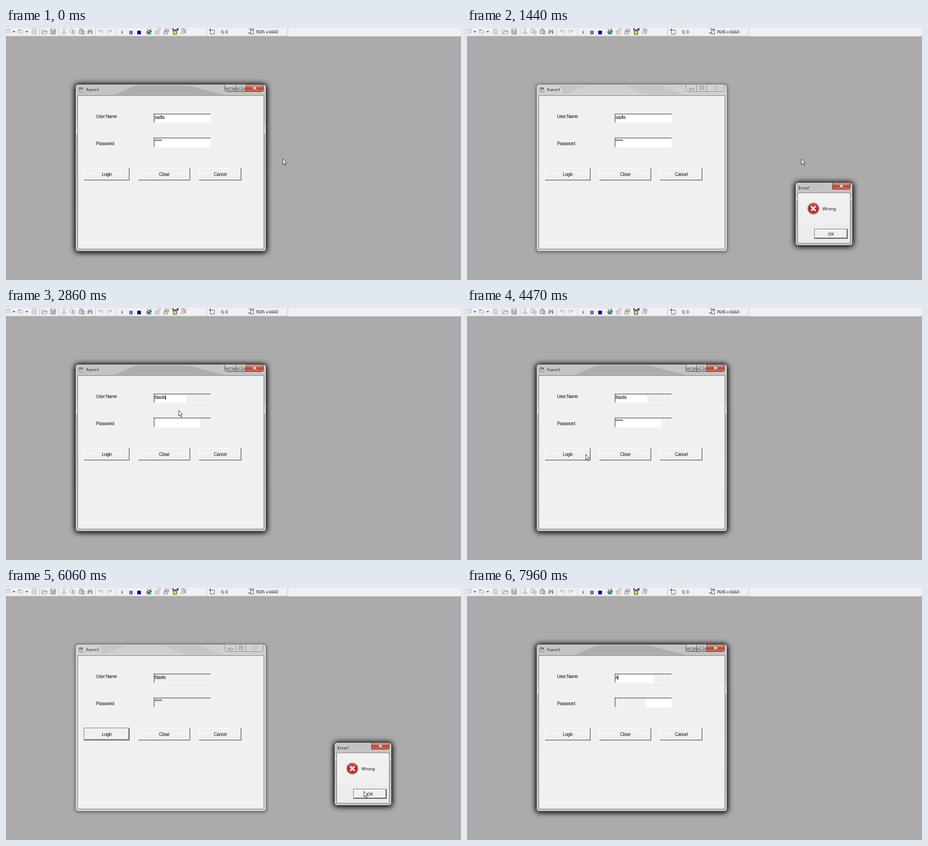
Animation, 1005 px wide and 557 px high, one loop 8000 ms. Source, as an HTML page with a canvas:

```html
<!DOCTYPE html>
<html lang="en">
<head>
<meta charset="utf-8">
<title>Login form</title>
<style>
html, body { margin: 0; width: 100%; height: 100%; overflow: hidden; background: #ababab; }
canvas { display: block; }
</style>
</head>
<body>
<canvas id="stage" width="1005" height="557"></canvas>
<script>
const stage = document.getElementById('stage').getContext('2d');
const layer = new OffscreenCanvas(1005, 557).getContext('2d');
let ctx = stage;

const LOOP = 8000, TICK = 132, TICK_PHASE = 108;
const USER_RATE = 126, PASSWORD_RATE = 115, BLINK = 445;
const FACE = '#f0f0f0', GRAY = '#a0a0a0', NAVY = '#00008b';
const CONTROL = '10px "Liberation Sans", Arial, sans-serif';
const CAPTION = '9.8px "Noto Sans", "Open Sans", sans-serif';
const STATUS = '9.3px "Noto Sans", "Open Sans", sans-serif';

// One entry per login attempt; white spans are [left, right, shown from].
const attempts = [
  { begin: 0, user: 'sadfa', userAt: -2000, passwordAt: -905, error: 1030, washed: 1720,
    userWhite: [328, 452, 0], passwordWhite: [328, 452, 0] },
  { begin: 1720, user: 'fdasfa', userAt: 2230, passwordAt: 3560, error: 5380, washed: 5380, lastDialogOut: 1840,
    userWhite: [328, 398, 2350], passwordWhite: [328, 429, 2230] },
  { begin: 6210, user: 'a', userAt: 7960, passwordAt: 2 * LOOP, error: LOOP, washed: LOOP, lastDialogOut: 6100,
    userWhite: [328, 412, 6750], passwordWhite: [394, 452, 6312] }
];

// Pointer way points: time, x, y
const route = [
  [0, 611, 289], [240, 738, 289], [1560, 738, 289], [1824, 664, 281], [2220, 425, 246],
  [2484, 388, 193], [2880, 378, 243], [3940, 378, 243], [4200, 366, 268], [4464, 262, 323],
  [4900, 262, 321], [5520, 262, 321], [5784, 372, 312], [6048, 790, 449], [6312, 394, 241],
  [6444, 380, 243], [6576, 394, 198], [6708, 408, 191], [LOOP, 408, 191]
];

const clamp = (v, lo, hi) => Math.max(lo, Math.min(hi, v));
const sample = t => Math.max(0, Math.floor((t - TICK_PHASE) / TICK) * TICK + TICK_PHASE);
const keysTyped = (t, start, rate, length) => clamp(Math.floor((t - start) / rate) + 1, 0, length);

function stateAt(t) {
  const a = attempts.findLast(item => item.begin <= t);
  const userKeys = keysTyped(t, a.userAt, USER_RATE, a.user.length);
  const stars = keysTyped(t, a.passwordAt, PASSWORD_RATE, 5);
  const focusAt = a.passwordAt - 310;
  const inPassword = t >= focusAt;
  const lastKey = stars ? a.passwordAt + (stars - 1) * PASSWORD_RATE
    : userKeys ? a.userAt + (userKeys - 1) * USER_RATE : -LOOP;
  const blinkFrom = Math.max(lastKey, inPassword ? focusAt : a.begin);
  const active = t < a.error;
  const s = sample(t);
  const opacity = active ? 1 - (s - a.lastDialogOut) / 200 : (s - a.error) / 280;
  return {
    ...a, active, inPassword, lastKey,
    typedUser: a.user.slice(0, userKeys),
    typedPassword: '*'.repeat(stars),
    caret: active && (t - blinkFrom) % (2 * BLINK) < BLINK,
    opacity: clamp(opacity || 0, 0, 1)
  };
}

function rect(color, x, y, w, h) {
  ctx.fillStyle = color;
  ctx.fillRect(x, y, w, h);
}

function path(d, stroke, fill, width = 1) {
  const shape = new Path2D(d);
  if (fill) { ctx.fillStyle = fill; ctx.fill(shape); }
  if (stroke) { ctx.strokeStyle = stroke; ctx.lineWidth = width; ctx.stroke(shape); }
}

function rounded(x, y, w, h, r, fill, stroke) {
  ctx.beginPath();
  ctx.roundRect(x, y, w, h, r);
  if (fill) { ctx.fillStyle = fill; ctx.fill(); }
  if (stroke) { ctx.strokeStyle = stroke; ctx.lineWidth = 1; ctx.stroke(); }
}

function text(str, x, y, font = CONTROL, align = 'left') {
  ctx.font = font;
  ctx.letterSpacing = font === CONTROL ? '-0.55px' : '-0.2px';
  ctx.textAlign = align;
  ctx.fillStyle = '#111';
  ctx.fillText(str, x, y);
}

function vertical(y0, y1, ...stops) {
  const g = ctx.createLinearGradient(0, y0, 0, y1);
  stops.forEach(([pos, color]) => g.addColorStop(pos, color));
  return g;
}

function edges(x, y, w, h, topLeft, bottomRight = topLeft) {
  rect(topLeft, x, y, w, 1);
  rect(topLeft, x, y, 1, h);
  rect(bottomRight, x, y + h - 1, w, 1);
  rect(bottomRight, x + w - 1, y, 1, h);
}

function button(label, x, y, w, h, focused, font) {
  const inset = focused ? 1 : 0;
  rect(FACE, x, y, w, h);
  if (focused) edges(x, y, w, h, '#606060');
  edges(x + inset, y + inset, w - 2 * inset, h - 2 * inset, '#fff', '#696969');
  edges(x + inset + 1, y + inset + 1, w - 2 * inset - 2, h - 2 * inset - 2, '#f5f5f5', GRAY);
  text(label, x + w / 2, y + h / 2 + 3.5, font, 'center');
}

function toolbar() {
  rect(FACE, 0, 0, 1005, 18);
  rect('#d0d0d0', 0, 18, 1005, 1);
  rect('#a0a0a0', 0, 19, 1005, 1);
  rect('#c4c4c4', 0, 17, 622, 1);
  for (const x of [74, 117, 197, 244, 443, 622]) {
    rect('#b0b0b0', x, 0, 1, 17);
    rect('#fff', x + 1, 0, 1, 17);
  }
  path('M15 7h5l-2.5 3zM43.5 7h5l-2.5 3z', null, '#222');
  path('M0 5l5-3 5 2-5 3zM0 11h8l3-4M27 3v8h10V6zM26 3l6 4M32 2l-4 6M57 2h10M57 5h10v8h-9V5M60 8h5M60 10.5h5', GRAY);
  // open, save
  path('M79 13V4h4l1 2h6v2M79 13l3-5h10l-3 5z', '#888');
  path('M98.5 2.5h11v11h-11zM101 3v4h6V3M102 13V9h5v4', '#888', '#c8c8c8');
  // cut, copy, paste, find
  path('M125 1l5 9M131 1l-5 9M123.5 11a2 2 0 1 0 4 0a2 2 0 1 0-4 0M128.5 11a2 2 0 1 0 4 0a2 2 0 1 0-4 0', GRAY);
  path('M141.5 2.5h6v8h-6zM146.5 5.5h6v8h-6zM148 8h3M148 10.5h3', GRAY, FACE);
  path('M161.5 3.5h9v9h-9zM164 2h4v2h-4zM167.5 6.5h6v7h-6z', '#909090', '#d0d0d0');
  path('M180 13V7l2-4h2v10zM187 13V3h2l2 4v6zM184 6h3v3h-3z', null, '#999');
  // undo, redo
  path('M206 4v4h4M206 8q5-6 9-1q1 3-3 5M233 4v4h-4M233 8q-5-6-9-1q-1 3 3 5', GRAY);
  // run, break, end
  path('M255 5l4 4.5-4 4.5z', null, '#8286a0');
  rect(NAVY, 273, 6, 2, 8);
  rect(NAVY, 277, 6, 2, 8);
  rect(NAVY, 290, 6, 8, 8);
  // tool windows
  path('M310 9l8-5 4 4-7 5z', '#222', '#30a0a0');
  path('M311 2l5 5M318 1l3 3M311 13h10', '#222');
  rect('#e0d040', 314, 6, 3, 2);
  path('M329.5 5.5h9v8h-9zM331 8h5M331 10.5h5M335 4l2-3h4v4l-3 3', '#999');
  path('M350.5 2.5h9v6h-9zM348.5 7.5h8v6h-8zM351 5h7', '#888', '#ddd');
  path('M369 6h9l-1 8h-7z', '#222', '#e8d83c');
  ['#c03030', '#2848c0', '#222'].forEach((color, i) => rect(color, 367 + 5 * i, 1 + 2 * (i % 2), 4, 4));
  path('M387 4l4-3 3 3-2 2 5 6M390 6l-4 7M395 2l3 3-8 8', '#888', null, 1.4);
  // position and size readouts
  path('M451.5 4.5h9v9h-9z', '#555');
  path('M448 4.5h6M451.5 1v6', '#222');
  path('M540.5 4.5h6v9h-6zM535 11h5M537 9v4M538 2.5h9M538 1v3M546 1v3', '#444');
  text('0, 0', 475, 11.5, STATUS);
  text('7605 x 6660', 551, 11.5, STATUS);
}

function closeButton(x, y, w, h, active) {
  const fill = active
    ? vertical(y, y + h, [0, '#dba196'], [.45, '#c9705f'], [.5, '#b8402c'], [1, '#d0705a'])
    : '#d2d2d2';
  rounded(x + .5, y + .5, w, h, [0, 0, 4, 0], fill, active ? '#5d2a24' : '#888');
  const cross = `M${x + w / 2 - 3} ${y + h / 2 - 2.5}l7 6m0-6l-7 6`;
  path(cross, '#555', null, 3.6);
  path(cross, '#fff', null, 1.8);
}

function windowFrame(x, y, w, h, active, title, titleX, top, streaks) {
  ctx.save();
  ctx.shadowColor = active ? 'rgba(0,0,0,.8)' : 'rgba(0,0,0,.55)';
  ctx.shadowBlur = active ? 13 : 7;
  ctx.shadowOffsetY = 1;
  rounded(x, y, w, h, 6, '#777');
  if (active) rounded(x, y, w, h, 6, '#777');
  ctx.restore();
  const glass = active
    ? vertical(y, y + h, [0, '#c3c3c3'], [.22, '#c3c3c3'], [.293, '#e6e6e6'], [.295, '#b4b4b4'], [1, '#c3c3c3'])
    : '#d0d0d0';
  rounded(x + .5, y + .5, w - 1, h - 1, 6, glass, active ? '#2c2c2c' : '#686868');
  path(streaks, null, active ? '#adadad' : '#c6c6c6');
  rounded(x + 1.5, y + 1.5, w - 3, h - 3, 5, null, '#e2e2e2');
  edges(x + 5, y + top - 1, w - 10, h - top - 4, '#777');
  rect(FACE, x + 6, y + top, w - 12, h - top - 6);
  ctx.save();
  ctx.shadowColor = 'rgba(255,255,255,.9)';
  ctx.shadowBlur = 9;
  text(title, titleX, y + 15.5, CAPTION);
  ctx.restore();
}

function field(y, h, str, showCaret, [left, right, from], t, washed) {
  rect(FACE, 326, y, 127, h);
  edges(326, y, 127, h, GRAY, '#f8f8f8');
  rect('#696969', 326, y + 1, 126, 1);
  rect('#696969', 327, y, 1, h - 1);
  if (t >= from && t < washed) rect('#fff', left, y + 2, right - left, h - 3);
  text(str, 328, y + 12);
  if (showCaret) rect('#000', 328 + Math.round(ctx.measureText(str).width), y + 3, 1, 11);
}

function form(t, s) {
  windowFrame(153, 124, 422, 370, s.active, 'Form1', 177, 26, s.active
    ? 'M238 148L286 127H400L484 148z'
    : 'M395 148L347 127H428L482 148zM215 148l50-21h-60z');

  // icon and caption buttons
  rect('#444', 161, 132, 8, 7);
  rect('#fff', 162, 134, 6, 4);
  rect('#3c8c96', 164, 135, 6, 7);
  rect('#e8f4f4', 165, 137, 4, 4);
  const fill = s.active
    ? vertical(125, 140, [0, '#d8d8d8'], [.48, '#bcbcbc'], [.5, '#8f8f8f'], [1, '#b2b2b2'])
    : '#d2d2d2';
  const line = s.active ? '#4c4c4c' : '#888';
  rounded(483.5, 124.5, 24, 16, [0, 0, 0, 4], fill, line);
  rounded(507.5, 124.5, 22, 16, 0, fill, line);
  closeButton(529, 124, 39, 16, s.active);
  path('M491.5 133.5h9v3h-9z', '#555', '#fff');
  path('M514.5 128.5h8v7h-8zM517 131h3v2h-3z', '#555', '#fff');

  text('User Name', 199, 198.5);
  text('Password', 199, 258.5);
  field(189, 21, s.typedUser, s.caret && !s.inPassword, s.userWhite, t, s.washed);
  field(242, 22, s.typedPassword, s.caret && s.inPassword, s.passwordWhite, t, s.washed);
  button('Login', 172, 309, 101, 28, !s.active && s.begin > 0);
  button('Close', 292, 309, 115, 28);
  button('Cancel', 426, 309, 94, 28);
}

function dialog({ opacity, active }) {
  if (!opacity) return;
  ctx = layer;
  ctx.clearRect(0, 0, 1005, 557);
  windowFrame(725, 341, 127, 140, true, 'Error!', 732, 24, '');
  rect('#ececec', 731, 435, 115, 40);
  closeButton(807, 341, 39, 15, true);
  ctx.beginPath();
  ctx.arc(765, 399, 12.5, 0, 7);
  ctx.fillStyle = vertical(386, 412, [0, '#d85c56'], [.5, '#b92520'], [1, '#c53c36']);
  ctx.fill();
  ctx.strokeStyle = '#b0a4a4';
  ctx.lineWidth = 1.6;
  ctx.stroke();
  path('M760 394l10 10m0-10l-10 10', '#f4f4f4', null, 3.6);
  text('Wrong', 785, 403, CAPTION);
  button('OK', 767, 444, 74, 22, !active, CAPTION);

  // the window grows from its top edge while it fades
  ctx = stage;
  const scale = .92 + .08 * opacity;
  ctx.save();
  ctx.globalAlpha = opacity;
  ctx.translate(788.5, 341);
  ctx.scale(scale, scale);
  ctx.drawImage(layer.canvas, -788.5, -341);
  ctx.restore();
}

function pointer(t, lastKey) {
  const now = sample(t);
  const i = route.findLastIndex(point => point[0] <= now);
  const [t0, x0, y0] = route[i], [t1, x1, y1] = route[i + 1];
  const resting = x0 === x1 && y0 === y1;
  if (resting && lastKey > t0) return; // typing hides a resting pointer
  const k = (now - t0) / (t1 - t0);
  const x = Math.round(x0 + (x1 - x0) * k), y = Math.round(y0 + (y1 - y0) * k);
  const overField = x > 326 && x < 452 && (y > 188 && y < 210 || y > 241 && y < 264);
  if (overField)
    path(`M${x - 3} ${y + .5}h2.5l1 1l1-1h2.5M${x + .5} ${y + 1}v13M${x - 3} ${y + 14.5}h2.5l1-1l1 1h2.5`, '#222');
  else
    path(`M${x + .5} ${y + .5}v12l2.8-2.6l2.2 5.2l2.2-1l-2.2-5h3.6z`, '#23233a', '#fff');
}

function frame(now) {
  const t = now % LOOP;
  const state = stateAt(t);
  rect('#ababab', 0, 0, 1005, 557);
  toolbar();
  form(t, state);
  dialog(state);
  pointer(t, state.lastKey);
  requestAnimationFrame(frame);
}
requestAnimationFrame(frame);
</script>
</body>
</html>
```
